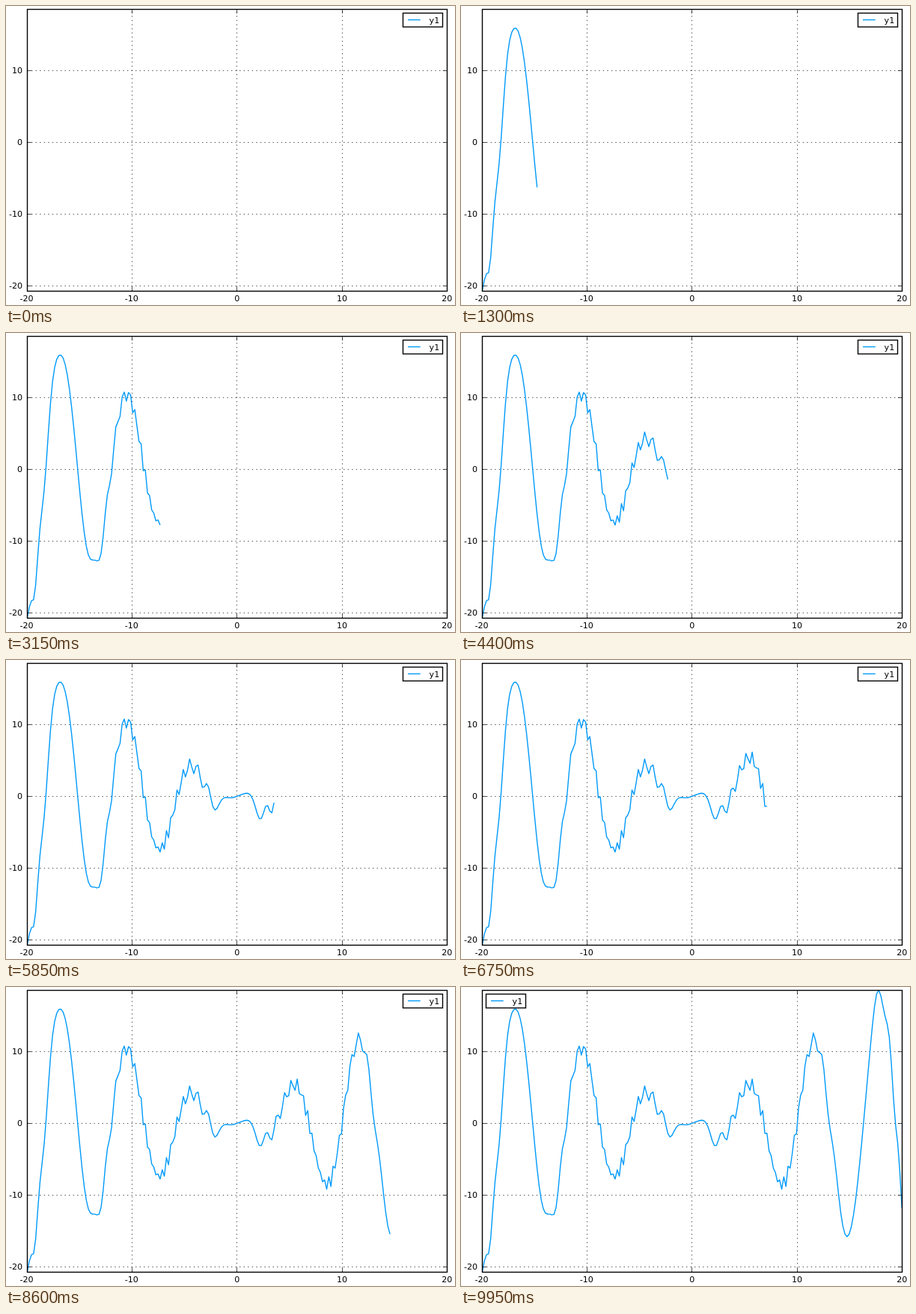
Write an HTML page that moves like this. It is 600 px wide and 400 px high and loops after 10 s.

```html
<!DOCTYPE html>
<html lang="en">
<head>
<meta charset="utf-8">
<title>Growing curve</title>
<style>
  html, body { margin: 0; width: 100%; height: 100%; overflow: hidden; background: #fff; }
  svg { display: block; width: 600px; height: 400px; }
  text { font: 11.1px "DejaVu Sans", sans-serif; fill: #000; }
  .curve { fill: none; stroke: #009afa; stroke-width: 1.39; stroke-linejoin: round; }
  .frame { stroke: #000; stroke-width: 1.39; }
  .grid { stroke: #000; stroke-width: .69; stroke-dasharray: 1.39 4.17; }
  .tick { stroke: #000; stroke-width: .69; }
</style>
</head>
<body>
<svg viewBox="0 0 600 400">
  <defs><clipPath id="area"><rect x="28.4" y="4.2" width="560.8" height="376.8"/></clipPath></defs>
  <rect width="600" height="400" fill="#fff"/>
  <g id="grid"></g>
  <g clip-path="url(#area)"><path id="curve" class="curve"/></g>
  <g id="axes"></g>
  <g id="legend">
    <rect class="frame" x="530.5" y="9.5" width="53" height="18.5" fill="#fff"/>
    <path class="curve" d="M537 18.5H553.7"/>
    <text x="565.6" y="22.6">y1</text>
  </g>
</svg>
<script>
const STEP = 50, COUNT = 200;
const box = { left: 28.4, right: 589.2, top: 4.2, bottom: 381 };
const $ = id => document.getElementById(id);

const f = x => x * Math.cos(x + 1) + Math.sin(x * x);
const xs = Array.from({ length: COUNT }, (_, i) => -20 + 40 * i / (COUNT - 1));
const ys = xs.map(f);
const yMin = Math.min(...ys), yMax = Math.max(...ys);

const px = x => box.left + (x + 20) / 40 * (box.right - box.left);
const py = y => box.top + (yMax - y) / (yMax - yMin) * (box.bottom - box.top);
const snap = v => Math.floor(v) + .5;
const points = xs.map((x, i) => [px(x), py(ys[i])]);

function add(parent, tag, attrs, text = "") {
  const el = document.createElementNS("http://www.w3.org/2000/svg", tag);
  for (const key in attrs) el.setAttribute(key, attrs[key]);
  el.textContent = text;
  $(parent).append(el);
}

const L = snap(box.left), R = snap(box.right), T = snap(box.top), B = snap(box.bottom);

for (const v of [-20, -10, 0, 10, 20]) {
  const x = snap(px(v));
  if (Math.abs(v) < 20) {
    add("grid", "path", { class: "grid", d: `M${x} ${B}V${T}` });
    add("axes", "path", { class: "tick", d: `M${x} ${B}v-5.6M${x} ${T}v5.6` });
  }
  add("axes", "text", { x: px(v) - (v < 0 ? .8 : 0), y: 394.6, "text-anchor": "middle" }, v);
}
for (const v of [-20, -10, 0, 10]) {
  const y = snap(py(v));
  add("grid", "path", { class: "grid", d: `M${L} ${y}H${R}` });
  add("axes", "path", { class: "tick", d: `M${L} ${y}h5.6M${R} ${y}h-5.6` });
  add("axes", "text", { x: 22, y: y + 3.6, "text-anchor": "end" }, v);
}
add("axes", "rect", { class: "frame", x: L, y: T, width: R - L, height: B - T, fill: "none" });

// The legend leaves its corner once a point falls inside it.
const moveAt = points.findIndex(([x, y]) => x > 530 && x < 584 && y > 9 && y < 28);

function draw(t) {
  const n = Math.floor(t / STEP) % COUNT;
  const shown = points.slice(0, n + 1).map(p => p.map(v => v.toFixed(2)).join(" "));
  $("curve").setAttribute("d", "M" + shown.join("L"));
  $("legend").setAttribute("transform", `translate(${n >= moveAt ? -497 : 0} 0)`);
}

let start;
function tick(now) {
  start ??= now;
  draw(now - start);
  requestAnimationFrame(tick);
}
draw(0);
requestAnimationFrame(tick);
</script>
</body>
</html>
```
